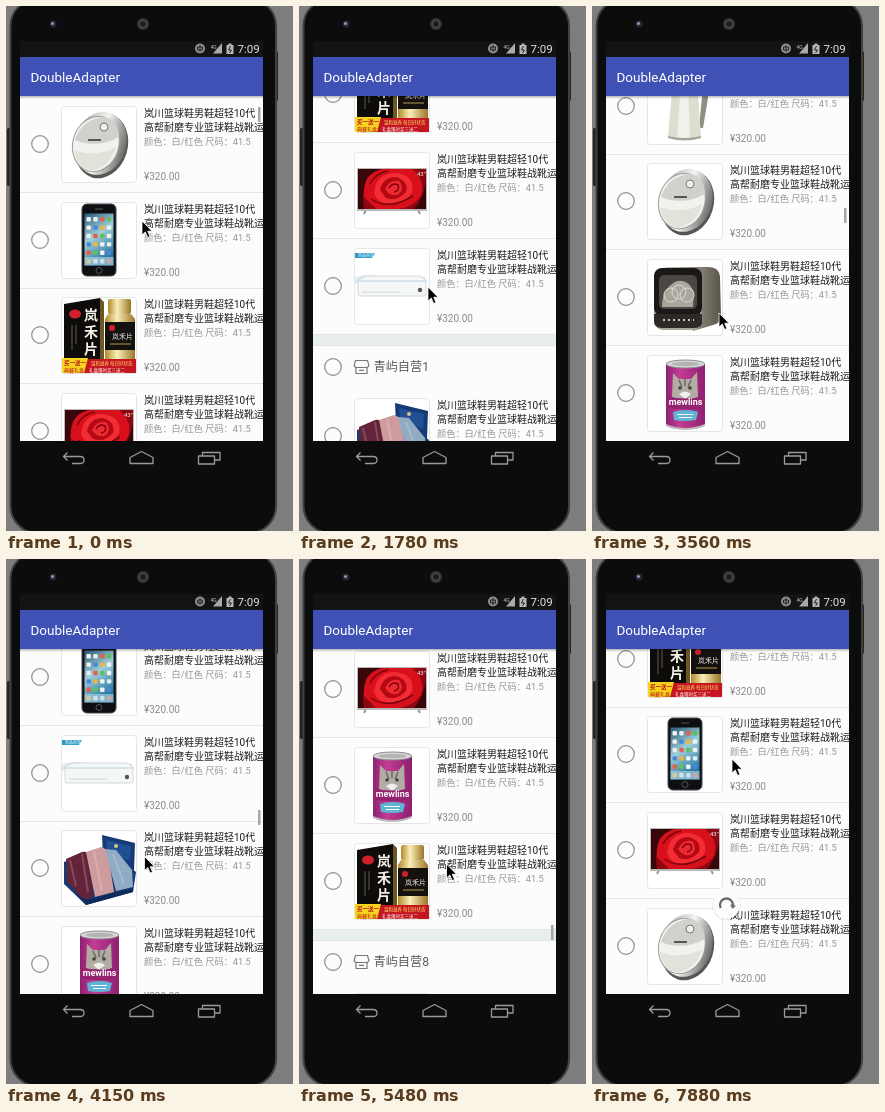
An HTML page for the animation above (8000 ms loop, 287x525 px).

```html
<!DOCTYPE html>
<html lang="zh">
<head>
<meta charset="utf-8">
<title>DoubleAdapter</title>
<style>
html, body { margin: 0; width: 100%; height: 100%; overflow: hidden; background: #7d7d7d; }
svg { display: block; }
text { font-family: Roboto, "Noto Sans CJK SC", "Noto Sans CJK", sans-serif; }
.name { font-size: 10px; fill: #1c1c1c; }
.spec { font-size: 9.2px; fill: #969696; }
.colon { font-family: "Noto Sans CJK TC", sans-serif; }
.price { font-size: 10px; fill: #8a8a8a; }
.shop { font-size: 12.2px; fill: #5c5c5c; }
.line { fill: none; stroke: #777; stroke-width: 1.2; }
.nav { fill: none; stroke: #9a9a9a; stroke-width: 1.3; stroke-linejoin: round; }
</style>
</head>
<body>
<svg id="stage" width="287" height="525" viewBox="0 0 287 525">
<defs>
  <linearGradient id="sky" x2=".4" y2="1">
    <stop offset="0" stop-color="#2c5878"/><stop offset=".5" stop-color="#9dcfda"/><stop offset="1" stop-color="#2b78a4"/>
  </linearGradient>
  <linearGradient id="metal">
    <stop offset="0" stop-color="#a9aaa8"/><stop offset=".5" stop-color="#f4f4f2"/><stop offset="1" stop-color="#6b6b69"/>
  </linearGradient>
  <linearGradient id="can">
    <stop offset="0" stop-color="#8d2070"/><stop offset=".35" stop-color="#c33d93"/><stop offset="1" stop-color="#8d2070"/>
  </linearGradient>
  <linearGradient id="gold">
    <stop offset="0" stop-color="#b08a2c"/><stop offset=".4" stop-color="#faeeb8"/><stop offset="1" stop-color="#9a7626"/>
  </linearGradient>
  <linearGradient id="side">
    <stop offset="0" stop-color="#d0cabb"/><stop offset="1" stop-color="#59544a"/>
  </linearGradient>
  <linearGradient id="shade" x2="0" y2="1">
    <stop offset="0" stop-opacity=".28"/><stop offset="1" stop-opacity="0"/>
  </linearGradient>

  <g id="v">
    <ellipse cx="3" cy="1" rx="26" ry="33" transform="rotate(17)" fill="#565654"/>
    <ellipse cx="1" cy="-1" rx="26" ry="32" transform="rotate(17)" fill="url(#metal)"/>
    <ellipse cx="-3" cy="1" rx="23" ry="28" transform="rotate(17)" fill="#f1f2ee" stroke="#9b9c99"/>
    <path d="M-24-4Q-17-26 7-27Q20-22 20-7Q-2 5-24-4" fill="#cfd1cd"/>
    <path d="M-25 6Q-4 14 17 3Q13 21-7 27Q-22 24-25 6" fill="#dfe3da"/>
    <circle cx="5" cy="-17" r="4" fill="#eee" stroke="#777"/>
    <rect x="-11" y="-5" width="13" height="2" fill="#555"/>
  </g>

  <g id="p">
    <rect x="-17" y="-36" width="34" height="72" rx="5" fill="#0e0f12" stroke="#44464a"/>
    <rect x="-14.5" y="-26.500" width="29" height="52" fill="url(#sky)"/>
    <g id="apps"></g>
    <rect x="-14.5" y="17" width="29" height="8.500" fill="#b9d9e4" opacity=".6"/>
    <path d="M-4-31H4" stroke="#555"/>
    <circle cy="30.500" r="3" fill="none" stroke="#555"/>
  </g>

  <g id="m">
    <path d="M-35-31L1-37V26H-35Z" fill="#0d0c0b"/>
    <path d="M1-37L5-33V26H1Z" fill="#6d5825"/>
    <ellipse cx="-24" cy="-21" rx="6" ry="4.500" fill="#d0202c"/>
    <g fill="#f4f1e6" font-size="14" font-weight="700"><text x="-15" y="-15">岚</text><text x="-15" y="2">禾</text><text x="-15" y="19">片</text></g>
    <path d="M-27-10V15M-23-10V9" stroke="#777059" stroke-width=".8"/>
    <rect x="9" y="-36" width="23" height="15" rx="2" fill="url(#gold)"/>
    <path d="M9-21H32L36-16V24H6V-16Z" fill="url(#gold)"/>
    <path d="M6-13H36V15H6Z" fill="#15110e"/>
    <circle cx="13" cy="-7" r="3" fill="#d0202c"/>
    <text x="13" y="4" fill="#eee" font-size="7">岚禾片</text>
    <path d="M11 9H32" stroke="#b29a4c"/>
    <rect x="-37" y="24" width="74" height="14" fill="#c51520"/>
    <path d="M-37 23H-11L-15 38H-37Z" fill="#f7d51d"/>
    <text x="-35" y="30" fill="#b3131d" font-size="5.500" font-weight="700">买一送一</text>
    <text x="-35" y="36.500" fill="#b3131d" font-size="5">典藏礼盒</text>
    <text x="-8" y="30" fill="#ffe36a" font-size="4.500">温和滋养 每日好状态</text>
    <text x="-10" y="36.500" fill="#fff" font-size="4.500">礼盒限时买三送二</text>
  </g>

  <g id="t">
    <path d="M-26 20L-28 24M26 20L28 24" stroke="#999" stroke-width="2"/>
    <rect x="-35" y="-22" width="70" height="43" fill="#b9b9b9"/>
    <rect x="-34" y="-21" width="68" height="40" fill="#8c0710"/>
    <path d="M-34-21H-12Q-33-9-28 19H-34ZM34-8Q31 9 22 19H34Z" fill="#39060a"/>
    <path d="M-28 7Q-30-18-8-21H20Q34-10 29 6Q21 18 5 19H-16Z" fill="#d8101b"/>
    <path d="M-18 3Q-16-17 4-17Q23-14 20 2Q13 15-3 14Q-15 13-18 3" fill="#f32c34"/>
    <path d="M-12 0Q-9-13 4-13Q17-9 14 2Q5 12-6 8Z" fill="#b40914"/>
    <path d="M-7-1Q-2-11 7-9Q13-2 7 4Q-1 8-7-1" fill="#ee2a31"/>
    <path d="M-3-2Q1-8 6-5Q8 1 2 2M-21 9Q-3 21 21 6M-22-6Q-16-17-4-19" fill="none" stroke="#78040d" stroke-width="1.500"/>
    <text x="25" y="-14" fill="#fff" font-size="6">43″</text>
  </g>

  <g id="b">
    <path d="M-37-33H-17L-20-28H-37Z" fill="#2d9bc9"/>
    <text x="-34" y="-29" fill="#fff" font-size="4">新品首发</text>
    <path d="M-37-9Q-20-14-3-7T33-10V-2H-37Z" fill="#dcebf4"/>
    <path d="M-34-6L-27-10H28L34-6V8Q34 10 31 10H-31Q-34 10-34 8Z" fill="#f5f6f6" stroke="#c9d0d3" stroke-width=".8"/>
    <path d="M-34-5H34" stroke="#b9d3e4"/>
    <circle cx="28" cy="4" r="2.200" fill="#555"/>
    <path d="M-30 6H8" stroke="#cfd8dc"/>
  </g>

  <g id="w">
    <path d="M3-33L36-25L35 3L4-12Z" fill="#153a76"/>
    <path d="M7-28L32-22L31-7L8-17Z" fill="#214f94"/>
    <path d="M-35-6L5-21L37 4L34 24L-13 37L-35 16Z" fill="#173b73"/>
    <path d="M-33-9L-17-16Q-10-17-9-11L-6 28L-15 33L-32 13Z" fill="#63243a"/>
    <path d="M-13-16L2-21Q7-20 9-15L15 24L-4 29Z" fill="#cf9c9e"/>
    <path d="M6-19L17-18L33 2L34 19L17 23Z" fill="#91abc4"/>
    <path d="M-29-8L-23 18M-17-14L-11 24M-5-17L3 23M14-14L25 16" stroke="#fff" opacity=".18" stroke-width="2"/>
    <path d="M-24 25L-13 37L34 24V20L-13 32Z" fill="#0f2b5a"/>
    <circle cx="17" cy="-22" r="2" fill="#d9c58b"/>
  </g>

  <g id="c">
    <path d="M-19-29H20V30Q20 36 0 36T-19 30Z" fill="url(#can)"/>
    <ellipse cy="-29" cx=".5" rx="19.500" ry="4" fill="#d8d8d8" stroke="#8d8d8d"/>
    <ellipse cy="-29" cx=".5" rx="14" ry="2.200" fill="#b4b4b4"/>
    <path d="M-13 4L-12-20L-6-14H6L12-21L13 4Q0 10-13 4" fill="#b3aca4"/>
    <path d="M-6-13L-3-6M0-14V-7M6-13L3-6" stroke="#6d6762" stroke-width="1.500"/>
    <circle cx="-5" cy="-5" r="1.800" fill="#3c4634"/><circle cx="5" cy="-5" r="1.800" fill="#3c4634"/>
    <path d="M-6 1Q0-4 6 1L0 6Z" fill="#eee"/>
    <path d="M-19 3Q0 8 20 3V14Q0 19-19 14Z" fill="#94246f"/>
    <text x=".5" y="12" text-anchor="middle" fill="#fff" font-size="9" font-weight="700">mewlins</text>
    <path d="M-12 19Q2 15 13 19L11 27Q0 29-11 27Z" fill="#5fb4d6"/>
    <path d="M-8 21.500H8M-6 24.500H7" stroke="#fff" stroke-width="1.200"/>
    <path d="M-19 31Q0 39 20 31V33Q0 41-19 33Z" fill="#bbb"/>
  </g>

  <g id="k">
    <path d="M12-24Q25-24 23-8L18 22H14L17-9Q18-17 11-17Z" fill="#8d8f84"/>
    <path d="M-12-26L-18-20L-13-16L-17 31Q0 35 16 31L12-26Z" fill="#dcded0"/>
    <path d="M-4-25L-8 32L5 33L3-25Z" fill="#f0f1e8"/>
    <path d="M-12-27Q0-37 12-27Z" fill="#c6c8b9"/>
    <path d="M-17 30Q0 34 16 30V32Q0 37-17 32Z" fill="#a4a698"/>
  </g>

  <g id="d">
    <path d="M-20-30H24Q34-30 35-20L36 20Q36 26 28 28L8 34Z" fill="url(#side)"/>
    <rect x="-31" y="-29" width="48" height="62" rx="9" fill="#a8a49a"/>
    <rect x="-31" y="-29" width="48" height="48" rx="8" fill="#1b1917"/>
    <rect x="-26" y="-22" width="38" height="34" rx="5" fill="#4b4843"/>
    <path d="M-23 10Q-23-8-10-15Q2-20 9-5L8 10Z" fill="#a9a69e"/>
    <g fill="none" stroke="#dedbd2"><circle cx="-14" cy="-2" r="7"/><circle cx="-6" cy="-5" r="7"/><circle cx="2" cy="-2" r="7"/></g>
    <path d="M-31 17H17V26Q16 31 9 31H-23Q-31 31-31 24Z" fill="#2d2a27"/>
    <path d="M-22 23H9" stroke="#c9c9c0" stroke-width="2" stroke-dasharray="2 3"/>
  </g>

  <g id="radio"><circle cx="34" r="8.300" fill="none" stroke="#8c8c8c" stroke-width="1.200"/></g>
  <g id="store" class="line">
    <path d="M56.500-6.500H68.500L69.800-2Q69.800.5 67 .5H58Q55.200.5 55.200-2ZM57 .5V6.500H68V.5M60 3.300H65"/>
  </g>
</defs>

<rect width="287" height="525" fill="#7d7d7d"/>
<rect x="1" y="122" width="5" height="58" rx="1.500" fill="#262626"/>
<rect x="268" y="45" width="4" height="50" rx="1.500" fill="#262626"/>
<rect x="4.500" y="-7" width="265.500" height="534" rx="27" fill="#0c0c0c" stroke="#404040" stroke-width="2"/>
<circle cx="47" cy="18" r="3.500" fill="#26283a"/><circle cx="46.500" cy="17.500" r="1.500" fill="#9a9ab0"/>
<circle cx="137" cy="18" r="6" fill="#363636"/><circle cx="137" cy="18" r="3.500" fill="#1b1b1b" stroke="#555"/>

<rect x="14" y="35" width="243" height="16" fill="#131313"/>
<circle cx="194" cy="42.500" r="5" fill="#8f8f8f"/>
<path d="M191.500 41H196.500V44H191.500ZM194 39V46" fill="none" stroke="#222"/>
<text x="204.500" y="43" fill="#ccc" font-size="5">4G</text>
<path d="M216 37V47.500H207Z" fill="#aaa"/>
<path d="M220.500 39H222.500V37.500H225.500V39H227.500V48H220.500Z" fill="#b8b8b8"/>
<path d="M224.500 40L222.500 44H225.500L223.500 47" fill="none" stroke="#222"/>
<text x="231.500" y="47.300" fill="#e0e0e0" font-size="11.500">7:09</text>
<rect x="14" y="51" width="243" height="39" fill="#3f51b5"/>
<text x="24.500" y="75.700" fill="#fff" font-size="13.500">DoubleAdapter</text>

<svg x="14" y="90" width="243" height="345" viewBox="14 90 243 345">
  <rect x="14" y="90" width="243" height="345" fill="#fcfcfc"/>
  <g id="list"></g>
  <ellipse id="glow" cx="135.500" cy="436" rx="122" fill="#8a8a8a" opacity=".35"/>
  <rect id="thumb" x="252" width="2.500" height="15" fill="#a6a6a6"/>
  <g id="spin">
    <circle cy="1" r="14.500" fill="#000" opacity=".06"/>
    <circle r="13.500" fill="#fcfcfc"/>
    <g id="turn" fill="none" stroke="#6c6c6c" stroke-width="2.300">
      <path id="arc"/><path id="tip" d="M3.500-1H9.500L6.500 3Z" fill="#6c6c6c" stroke="none"/>
    </g>
  </g>
  <rect x="14" y="90" width="243" height="3" fill="url(#shade)"/>
</svg>

<g class="nav">
  <path d="M61.500 446.500L57.500 450.500L61.500 454.500M57.500 450.500H74Q78 450.500 78 454T74 457.500H66"/>
  <path d="M124 451.500L135.500 445.500L147 451.500V457.500H124Z"/>
  <path d="M192.500 450H208.500V458H192.500ZM196.500 450V446.500H214V454H208.500"/>
</g>
<path id="mouse" d="M0 0V14L3.300 11L5.700 16.500L8 15.500L5.700 10.200H10Z" fill="#000" stroke="#fff" stroke-width=".8"/>
</svg>

<script>
const LOOP = 8000, STEP = 147.5, LAST = 53;
const ROW = 95.75, GAP = 12, HEAD = 42, TOP = 90, BOTTOM = 435;
const $ = id => document.getElementById(id);

// Each letter is a product; each string is one shop's section.
const shops = ['vpmtb', 'wpkdtvmc', 'wpvbdkmt', 'kvdcwptm', 'dtvpbwck',
  'pkvmtdwb', 'mpmtvckd', 'bwvdptcm', 'kdwcmptv'];

const colon = '<tspan class="colon">：</tspan>';

const row = (kind, y, last) => `<g transform="translate(0 ${Math.round(y + ROW / 2)})">
  <use href="#radio"/>
  <rect x="55.500" y="-37.500" width="75" height="76" rx="3" fill="#fff" stroke="#e6e6e6"/>
  <use href="#${kind}" x="93"/>
  <text class="name" x="138" y="-27.200">岚川篮球鞋男鞋超轻10代</text>
  <text class="name" x="138" y="-13.200">高帮耐磨专业篮球鞋战靴运动鞋</text>
  <text class="spec" x="138" y="0.500">颜色${colon}白/红色 尺码${colon}41.5</text>
  <text class="price" x="138" y="35.800">¥320.00</text>
  ${last ? '' : '<path d="M14 48.500H257" stroke="#e6e6e6"/>'}</g>`;

const header = (i, top) => {
  const y = Math.round(top);
  return `<rect x="14" y="${y}" width="243" height="${GAP}" fill="#e9efef"/>
  <path d="M14 ${y + .5}H257M14 ${y + GAP - .5}H257" stroke="#dfe5e5"/>
  <g transform="translate(0 ${y + GAP + HEAD / 2})"><use href="#radio"/><use href="#store"/>
  <text class="shop" x="74.500" y="4.300">青屿自营${i}</text></g>`;
};

const starts = [];
let y = TOP, html = '';
shops.forEach((items, i) => {
  starts.push(y);
  if (i) { html += header(i, y); y += GAP + HEAD; }
  [...items].forEach((kind, k) => {
    html += row(kind, y, k === items.length - 1);
    y += ROW;
  });
});
$('list').innerHTML = html;
const end = y - BOTTOM;

const tints = ['#f2f2f2', '#5fc05a', '#f0b53a', '#e2604c', '#4a86d8', '#e8eef0'];
$('apps').innerHTML = Array.from({ length: 24 }, (_, i) =>
  `<rect x="${-12.5 + i % 4 * 6.8}" y="${-23 + (i >> 2) * 8.4}" width="4.400" height="4.400" rx="1" fill="${tints[i * 5 % 7 % 6]}"/>`).join('');

const thirdRow = starts[3] + GAP + HEAD + ROW / 2;
const scroll = [[0, 0], [4, 60], [8, 125], [12, 241], [14, 640], [17, starts[2] - 190],
  [21, 1850], [24, thirdRow - 100], [28, 3300], [32, starts[6] - 93.5], [36, 5750], [41, end]];
const thumb = [[0, 101], [12, 111], [17, 155], [24, 202], [32, 299], [41, 419]];
const mouseX = [[0, 136], [12, 129], [17, 127], [24, 127], [32, 150], [42, 145], [49, 145], [53, 140]];
const mouseY = [[0, 215], [3, 340], [7, 275], [9, 345], [12, 281], [14, 225], [17, 371], [20, 250],
  [22, 372], [24, 307], [27, 230], [29, 365], [32, 283], [35, 215], [38, 350], [42, 242],
  [46, 248], [49, 248], [53, 200]];
const spinY = [[39, 452], [42, 386], [46, 393], [49, 393], [53, 346]];
const glow = [[39, 0], [41, 6], [43, 5], [46, 2], [47, 0]];

function at(keys, n) {
  const i = keys.findIndex(k => k[0] >= n);
  if (i < 0) return keys[keys.length - 1][1];
  if (i === 0) return keys[0][1];
  const [a, u] = keys[i - 1], [b, v] = keys[i];
  return u + (v - u) * (n - a) / (b - a);
}

const move = (id, x, y) => $(id).setAttribute('transform', `translate(${x} ${y})`);

function drawSpinner(n) {
  const y = at(spinY, n);
  const pull = Math.max(0, Math.min(1, (393 - y) / 47));
  const sweep = 2.3 + pull * 1.5, r = 6.5;
  move('spin', 134.5, y);
  $('arc').setAttribute('d', `M${r * Math.cos(sweep)} ${-r * Math.sin(sweep)}A${r} ${r} 0 ${sweep > Math.PI ? 1 : 0} 1 ${r} 0`);
  $('turn').setAttribute('transform', `rotate(${140 - 130 * pull})`);
  $('turn').setAttribute('opacity', .4 + .6 * pull);
  $('tip').setAttribute('opacity', pull > .5 ? 1 : 0);
}

function draw() {
  const n = Math.min(LAST, Math.floor(performance.now() % LOOP / STEP));
  move('list', 0, -Math.round(at(scroll, n)));
  move('mouse', at(mouseX, n), at(mouseY, n));
  $('thumb').setAttribute('y', Math.round(at(thumb, n)));
  $('thumb').setAttribute('opacity', n > 45 || (n > 9 && n < 14) ? 0 : 1);
  $('glow').setAttribute('ry', at(glow, n));
  drawSpinner(n);
  requestAnimationFrame(draw);
}
draw();
</script>
</body>
</html>
```
